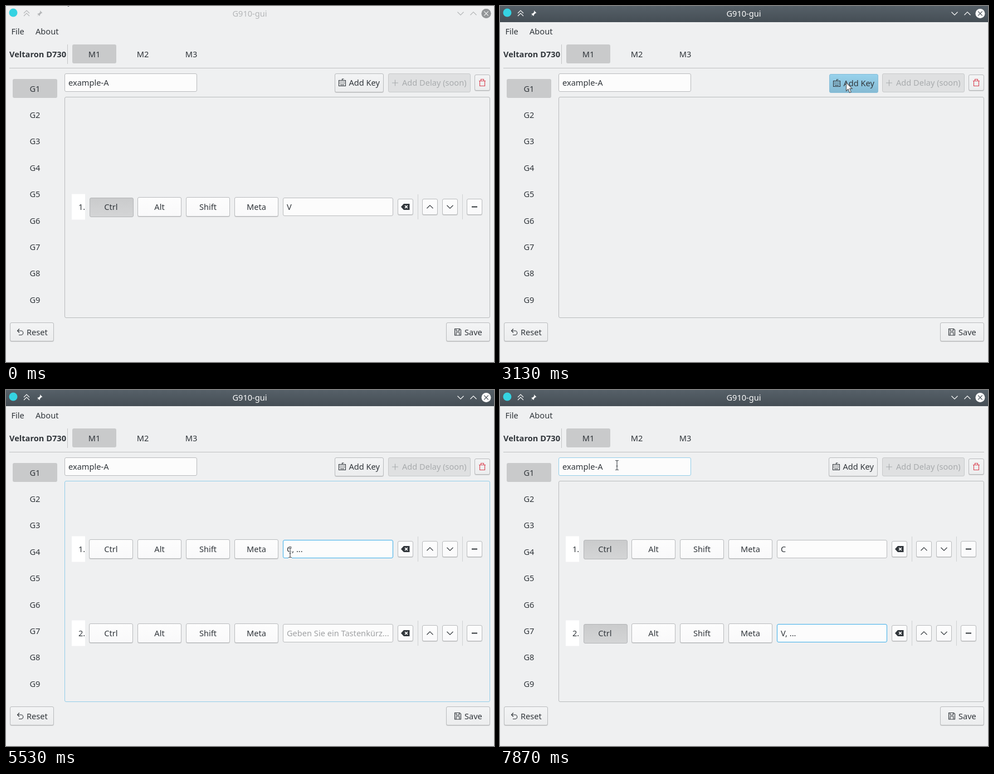
Write an HTML page that moves like this. It is 876 px wide and 639 px high and loops after 8000 ms.

```html
<!DOCTYPE html>
<html lang="en">
<head>
<meta charset="utf-8">
<title>G910-gui</title>
<style>
  html, body { margin: 0; width: 100%; height: 100%; overflow: hidden; background: #eff0f1; }
  svg { display: block; width: 876px; height: 639px; }
  text { font: 14.6px "Noto Sans", sans-serif; fill: currentColor; white-space: pre; }
  .mid { text-anchor: middle; }
  .bold { font-weight: 700; }
  .line { fill: none; stroke: currentColor; stroke-width: 1.1; }
</style>
</head>
<body>
<svg id="stage" viewBox="0 0 876 639" color="#31363b">
  <defs>
    <linearGradient id="bar" x2="0" y2="1"><stop stop-color="#566068"/><stop offset="1" stop-color="#454e55"/></linearGradient>
    <linearGradient id="plain" x2="0" y2="1"><stop stop-color="#f3f4f5"/><stop offset="1" stop-color="#ecedee"/></linearGradient>
    <linearGradient id="white" x2="0" y2="1"><stop stop-color="#fdfdfd"/><stop offset="1" stop-color="#f9f9fa"/></linearGradient>
    <linearGradient id="down" x2="0" y2="1"><stop stop-color="#cacbcc"/><stop offset="1" stop-color="#d4d5d6"/></linearGradient>
    <linearGradient id="focus" x2="0" y2="1"><stop stop-color="#46b3eb"/><stop offset="1" stop-color="#389fd6"/></linearGradient>
    <linearGradient id="glow" x2="0" y2="1"><stop stop-color="#98d2ec"/><stop offset="1" stop-color="#85bad3"/></linearGradient>
  </defs>
  <g id="fixed"></g>
  <g id="live"></g>
</svg>
<script>
const LOOP = 8000, TICK = 200 / 3;
const EDGE = '#b9bbbd', HOVER = '#93cee9', FOCUS = '#3daee9';
const NAME = [105, 121, 238, 33], PANEL = [105, 163, 764, 397];
const ADD = [590, 121, 88, 34], TRASH = [841, 123, 28, 29];

// Pointer path: time, x, y
const PATH = [
  [0, 105, -18], [200, 230, 60], [470, 560, 190], [870, 838, 172], [930, 838, 172],
  [1000, 851, 146], [1600, 855, 141], [2000, 855, 141], [2200, 755, 172], [2270, 690, 170],
  [2400, 622, 139], [2600, 622, 139], [2670, 621, 137], [3730, 621, 137], [4000, 592, 215],
  [4330, 537, 302], [4470, 536, 287], [5470, 536, 287], [5670, 450, 302], [5800, 320, 308],
  [6000, 187, 277], [6270, 187, 277], [6530, 189, 428], [6730, 189, 428], [7000, 545, 458],
  [7130, 540, 440], [7470, 540, 440], [7670, 390, 270], [7870, 210, 135], [8000, 210, 135]
];

const text = (s, x, y, cls = '') => `<text x="${x}" y="${y}" class="${cls}">${s}</text>`;
const path = (d, extra = '') => `<path class="line" d="${d}" ${extra}/>`;
const box = (x, y, w, h, fill, stroke, r = 2.5) =>
  `<rect x="${x + .5}" y="${y + .5}" width="${w - 1}" height="${h - 1}" rx="${r}" fill="${fill}" stroke="${stroke}"/>`;
const flat = (x, y, w, h, fill, r = 0) =>
  `<rect x="${x}" y="${y}" width="${w}" height="${h}" rx="${r}" fill="${fill}"/>`;
const button = (x, y, w, h, fill = 'url(#plain)', edge = EDGE) =>
  flat(x, y + 1, w, h, '#0002', 3) + box(x, y, w, h, fill, edge);
const tint = (color, s) => `<g color="${color}">${s}</g>`;
const inside = (p, [x, y, w, h]) => p.x >= x && p.x <= x + w && p.y >= y && p.y <= y + h;
const between = (t, a, b) => t >= a && t < b;
const ramp = (t, a, b) => Math.max(0, Math.min(1, (t - a) / (b - a)));

const chevron = (x, y, up, s = 5.5) => {
  const d = up ? s / 2 : -s / 2;
  return path(`M${x - s} ${y + d}L${x} ${y - d}L${x + s} ${y + d}`);
};
const cross = (x, y, s, color, w = 1.2) =>
  `<path d="M${x - s} ${y - s}l${2 * s} ${2 * s}m0 ${-2 * s}l${-2 * s} ${2 * s}" stroke="${color}" stroke-width="${w}"/>`;

function titleBar(fg, bg, mark) {
  return flat(0, 0, 876, 29, bg) + tint(fg,
    chevron(37, 10.5, true, 5) + chevron(37, 15.5, true, 5) +
    '<path d="M61 8l4.5 4.5-2 .6-2.4 2.4-.6 2.8-2-2-3.6 3.3 3.2-3.7-2-2 2.8-.6 2.4-2.4z" fill="currentColor"/>' +
    text('G910-gui', 437.5, 19, 'mid') +
    chevron(816, 13.5, false) + chevron(839, 13.5, true) +
    '<circle cx="862" cy="13.5" r="8.5" fill="currentColor"/>' + cross(862, 13.5, 3.8, mark));
}

function trashIcon() {
  return tint('#da4453', path('M849 134.5h12M852.5 134v-2.5h5v2.5M850.5 135v8.500h9v-8.500'));
}

function keyboardIcon() {
  return path('M597.500 133.500h12v10h-12zM600 141.500h7M603.500 133v-2h3') +
    path('M599 136h9M599 138.800h9', 'stroke-dasharray="1.5 1"');
}

function drawFixed() {
  let s = text('File', 9.5, 51) + text('About', 53, 51) + text('Veltaron D730', 6, 91.5, 'bold');
  s += flat(110, 69, 1, 35, '#c3c5c6') + flat(6, 111, 863, 1, '#bfc1c2');
  s += flat(119, 69, 79, 34, '#c9cacb', 3) + flat(12, 131, 80, 34, '#c9cacb', 3);
  for (let i = 0; i < 3; i++) s += text('M' + (i + 1), 158.5 + 87 * i, 91.5, 'mid');
  for (let i = 0; i < 9; i++) s += text('G' + (i + 1), 52, Math.round(153.5 + 47.4 * i), 'mid');
  s += box(686, 121, 148, 34, '#dfe0e1', '#c8cacb');
  s += tint('#a8abad', path('M693 138h11M698.500 132.500v11') + text('Add Delay (soon)', 711, 143));
  s += button(7, 568, 79, 34) + text('Reset', 37, 591);
  s += path('M24 579.500l-3.500 3.500 3.500 3.500M20.500 583h6.500a3.600 3.600 0 0 1 0 7.500h-4');
  s += button(790, 568, 79, 34) + text('Save', 823, 591);
  s += path('M805.500 579.500h9l2 2v9.500h-11zM808 579.500v4h5.500v-4M808 591v-5h6v5');
  return s;
}

function field(rect, value, hint, edge) {
  return box(...rect, '#fcfcfc', edge) +
    tint(hint ? '#a0a2a4' : 'currentColor', text(value, rect[0] + 7, rect[1] + 21.5));
}

const inputOf = y => [497, y - 17, 198, 33];

function row(n, y, { ctrl, value, focused }, p) {
  let s = flat(118, y - 23.500, 24, 46, '#fff') + text(n + '.', 130, y + 5);
  ['Ctrl', 'Alt', 'Shift', 'Meta'].forEach((label, i) => {
    const x = Math.round(149 + 86.900 * i), on = ctrl && !i ? 1 : 0;
    const area = [x + on, y - 17.500 + on + .5 - 1 + .5 - .5, 79, 35];
    area[1] = y - 18 + on;
    const edge = inside(p, area) ? HOVER : on ? '#b4b6b8' : EDGE;
    s += (on ? box : button)(...area, on ? 'url(#down)' : 'url(#white)', edge);
    s += text(label, x + 39.500, y + 5, 'mid');
  });
  const input = inputOf(y);
  const edge = focused ? FOCUS : inside(p, input) ? HOVER : EDGE;
  s += field(input, value || 'Geben Sie ein Tastenkürz...', !value, edge);
  for (const x of [703, 747, 783, 827]) {
    const area = [x, y - 15, 28, 29];
    s += button(...area, 'url(#white)', inside(p, area) ? HOVER : EDGE);
  }
  s += `<path d="M709 ${y - .5}l5-5.500h10.500v11h-10.500z" fill="currentColor"/>` + cross(718.500, y - .5, 2.400, '#fff', 1.500);
  s += chevron(761, y - .5, true) + chevron(797, y - .5, false) + flat(836, y - 1.500, 10, 2, 'currentColor');
  s += flat(739, y - 23, 1, 45, '#cfd1d2') + flat(819, y - 23, 1, 45, '#cfd1d2');
  return s;
}

function addButton(t, p) {
  const pressed = between(t, 2670, 3200) || between(t, 3530, 3730);
  const over = inside(p, ADD);
  const lit = ramp(t, 2600, 2870) * (1 - ramp(t, 5070, 5270));
  let s = button(...ADD, 'url(#plain)', over ? HOVER : EDGE);
  if (lit) {
    if (pressed) s = '';
    s += `<g opacity="${lit}">` + box(...ADD, `url(#${over ? 'glow' : 'focus'})`, over ? '#86bdd8' : '#3a9fd5') + '</g>';
  }
  s += tint(lit > .5 && !over ? '#fcfcfc' : 'currentColor', keyboardIcon() + text('Add Key', 615.500, 143));
  return pressed ? `<g transform="translate(1 1)">${s}</g>` : s;
}

function rowsAt(t) {
  const first = { ctrl: t >= 6200, value: t < 5530 ? '' : t < 6600 ? 'C, ...' : 'C', focused: between(t, 5130, 6600) };
  if (t < 1800) return [[361, { ctrl: true, value: 'V' }]];
  if (t < 3200) return [];
  if (t < 3730) return [[361, first]];
  return [[286, first], [437, { ctrl: t >= 6670, value: t < 7470 ? '' : 'V, ...', focused: t >= 7200 }]];
}

function pointerAt(t) {
  const i = Math.max(1, PATH.findIndex(k => k[0] >= t));
  const [a, x, y] = PATH[i - 1], [b, u, v] = PATH[i], f = ramp(t, a, b);
  return { x: Math.round(x + (u - x) * f), y: Math.round(y + (v - y) * f) };
}

function pointer(p, beam) {
  const shape = beam
    ? '<path d="M-3-8.500h2l1 1 1-1h2M-3 8.500h2l1-1 1 1h2M0-7.500v15M-1.500 1.500h3" fill="none" stroke="#fff" stroke-width="3"/>' +
      '<path d="M-3-8.500h2l1 1 1-1h2M-3 8.500h2l1-1 1 1h2M0-7.500v15M-1.500 1.500h3" fill="none" stroke="#4b5055" stroke-width="1.2"/>'
    : '<path d="M.5.5V15.500L4 12.300 6.500 18.500 9.200 17.400 6.700 11.400H11.200Z" fill="#fcfcfc" stroke="#50555a" stroke-width="1.1"/>';
  return `<g transform="translate(${p.x} ${p.y})">${shape}</g>`;
}

function drawLive(t) {
  const p = pointerAt(t), rows = rowsAt(t);
  const active = t < 1800 ? 0 : t < 1870 ? .72 : t < 1930 ? .9 : 1;
  let s = titleBar('#b4b6b8', '#eff0f1', '#eff0f1');
  if (!active) s += '<circle cx="862" cy="13.5" r="8.5" fill="#939698"/>' + cross(862, 13.5, 3.8, '#eff0f1');
  s += `<g opacity="${active}">${titleBar('#fcfcfc', 'url(#bar)', '#475057')}</g>`;
  s += '<circle cx="13" cy="12" r="7.5" fill="#35d3e2"/>';
  const nameEdge = between(t, 1870, 2670) ? FOCUS : inside(p, NAME) ? HOVER : EDGE;
  s += field(NAME, 'example-A', false, nameEdge) + addButton(t, p);
  s += button(...TRASH, 'url(#plain)', inside(p, TRASH) ? HOVER : EDGE) + trashIcon();
  s += box(...PANEL, 'none', inside(p, PANEL) ? HOVER : EDGE);
  rows.forEach(([y, state], i) => s += row(i + 1, y, state, p));
  const beam = inside(p, NAME) || rows.some(([y]) => inside(p, inputOf(y)));
  return s + pointer(p, beam);
}

const live = document.getElementById('live');
document.getElementById('fixed').innerHTML = drawFixed();
let shown = -1;

function tick() {
  const step = Math.floor((performance.now() % LOOP + 4) / TICK) % 120;
  if (step !== shown) {
    shown = step;
    live.innerHTML = drawLive(Math.round(step * TICK / 10) * 10);
  }
  requestAnimationFrame(tick);
}
tick();
</script>
</body>
</html>
```
